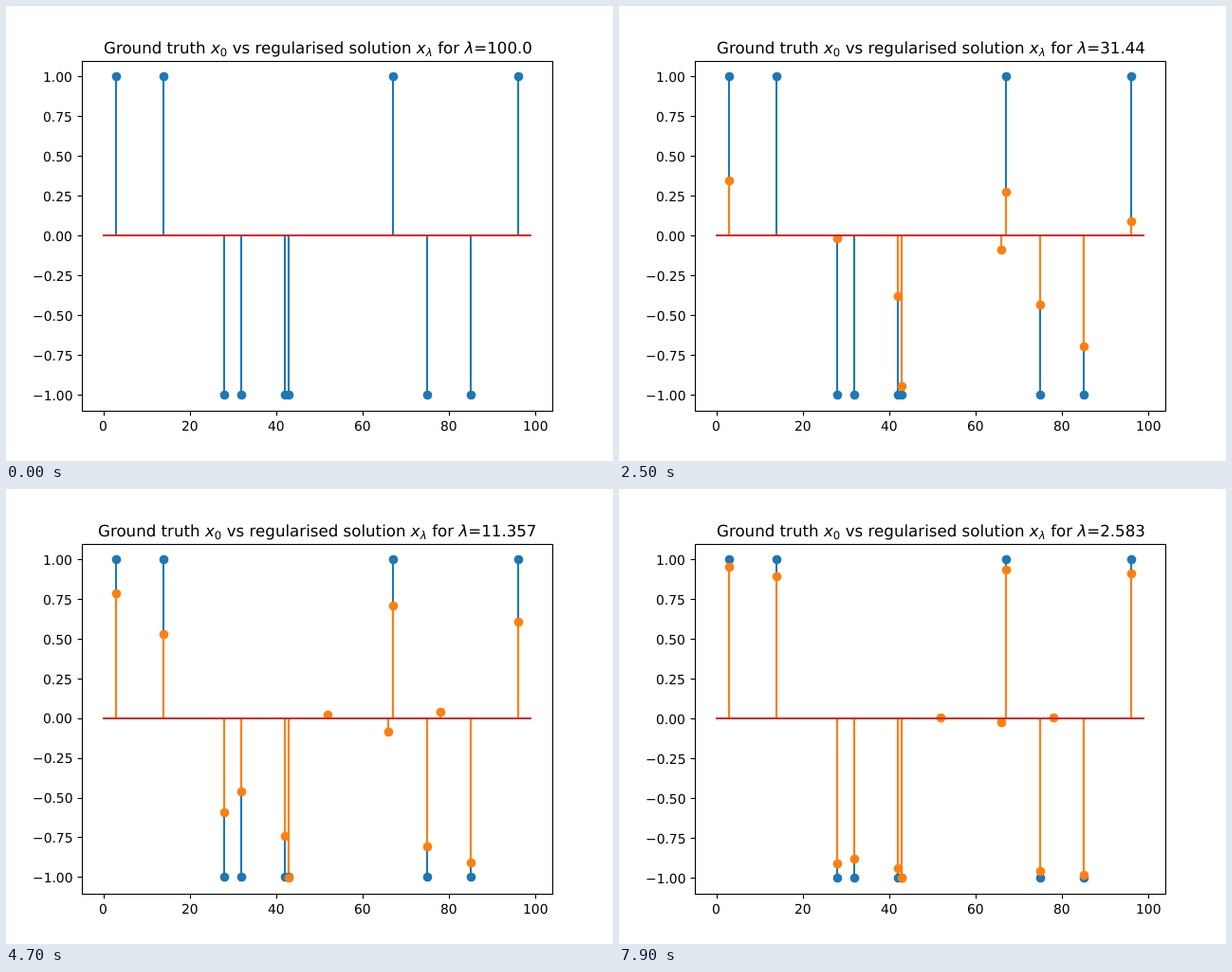
Write an HTML page that moves like this. It is 640 px wide and 480 px high and loops after 8000 ms.

```html
<!DOCTYPE html>
<html lang="en">
<head>
<meta charset="utf-8">
<title>Regularisation path</title>
<style>
  html, body { margin: 0; width: 100%; height: 100%; overflow: hidden; background: #fff; }
  svg { display: block; width: 640px; height: 480px; }
  text { font-family: "DejaVu Sans", sans-serif; font-size: 13.889px; text-rendering: geometricPrecision; white-space: pre; }
  .title { font-size: 16.667px; }
  .sub { font-size: 11.667px; }
  .var { font-style: italic; }
</style>
</head>
<body>
<svg id="stage" viewBox="0 0 640 480"></svg>
<script>
const BLUE = '#1f77b4', ORANGE = '#ff7f0e', RED = '#d62728';
const STEP = 100, STEPS = 80;
const TOP = 57.6, BOTTOM = 427.2, LEFT = 80, RIGHT = 576;
const KINK = 21.05; // below this lambda every path runs straight to its true value

// Each path leaves zero at lambda = start and reaches level at the kink.
const path = (truth, pos, level, start = KINK) => ({ truth, pos, level, start });
const paths = [
  path(1, 3, .611, 45.3),
  path(1, 14, .129, 27),
  path(-1, 28, -.245, 32),
  path(-1, 32, 0),
  path(-1, 42, -.52, 58),
  path(-1, 43, -1.0115, 95.5),
  path(0, 52, .04, 26),
  path(0, 66, -.158, 45),
  path(1, 67, .463, 47),
  path(-1, 75, -.64, 53),
  path(0, 78, .08, 27),
  path(-1, 85, -.83, 75),
  path(1, 96, .272, 36.6)
];

function coefficient({ truth, level, start }, lambda) {
  if (lambda <= KINK) return truth + (level - truth) * lambda / KINK;
  if (lambda >= start) return 0;
  const span = start - KINK;
  const bend = 1 + .375 * (span / 74.5) ** 4; // long paths curve more
  return level * (1 - ((lambda - KINK) / span) ** bend);
}

const stage = document.getElementById('stage');
function add(tag, attrs, text, parent = stage) {
  const el = document.createElementNS('http://www.w3.org/2000/svg', tag);
  set(el, attrs);
  if (text !== undefined) el.textContent = text;
  return parent.appendChild(el);
}
function set(el, attrs) {
  for (const name in attrs) el.setAttribute(name, attrs[name]);
}
// Starts a text on a whole pixel; share is the part of its width left of x.
function alignText(el, x, share) {
  set(el, { x: Math.round(x - share * el.getComputedTextLength()) });
}

const xAt = v => LEFT + (v + 4.95) * (RIGHT - LEFT) / 108.9;
const line = (stroke, width = 2.083) => add('line', { stroke, 'stroke-width': width });
const dot = fill => add('circle', { fill, r: 4.86 });
const baseline = () => {
  const el = line(RED);
  set(el, { x1: Math.round(xAt(0)) - 1, x2: Math.round(xAt(99)) + 1 });
  return el;
};

const truths = paths.filter(p => p.truth);
for (const p of truths) p.blueStem = line(BLUE);
for (const p of paths) p.stem = line(ORANGE);
for (const p of truths) p.blueDot = dot(BLUE);
const baseLow = baseline();
for (const p of paths) p.dot = dot(ORANGE);
const baseTop = baseline();

for (let v = 0; v <= 100; v += 20) {
  const x = Math.round(xAt(v)) + .5;
  set(line('#000', 1.111), { x1: x, x2: x, y1: 427.5, y2: 432.3 });
  alignText(add('text', { y: 448 }, v), xAt(v), .5);
}
const yTicks = [];
for (let value = -1; value <= 1; value += .25) {
  const mark = line('#000', 1.111);
  set(mark, { x1: 75.6, x2: 80.5 });
  const label = add('text', {}, (value < 0 ? '\u2212' : '') + Math.abs(value).toFixed(2));
  alignText(label, 70.28, 1);
  yTicks.push({ value, mark, label });
}
add('rect', { x: 80.5, y: 58.5, width: 496, height: 369, fill: 'none', stroke: '#000', 'stroke-width': 1.111 });

const title = add('text', { class: 'title', y: 50 });
const span = (text, attrs = {}) => add('tspan', attrs, text, title);
span('Ground truth ');
span('x', { class: 'var' });
span('0', { class: 'sub', dy: 2.7 });
span(' vs regularised solution ', { dx: .3, dy: -2.7 });
span('x', { class: 'var' });
span('λ', { class: 'sub var', dy: 2.7 });
span(' for ', { dx: .3, dy: -2.7 });
span('λ', { class: 'var' });
const readout = span('');

function draw(step) {
  const lambda = 10 ** (2 - 4 * step / 199);
  const rounded = String(+lambda.toFixed(3));
  readout.textContent = '=' + (rounded.includes('.') ? rounded : rounded + '.0');
  alignText(title, 328.3, .5);

  for (const p of paths) p.value = coefficient(p, lambda);
  const low = Math.min(-1, ...paths.map(p => p.value));
  const unit = (BOTTOM - TOP) / 1.1 / (1 - low);
  const yAt = v => 74.4 + (1 - v) * unit;
  const zero = Math.round(yAt(0));

  const place = (pos, stem, marker, value) => {
    const x = Math.round(xAt(pos)), y = Math.round(yAt(value));
    set(stem, { x1: x, x2: x, y1: zero, y2: y });
    set(marker, { cx: x + .5, cy: y + .5 });
  };
  for (const p of truths) place(p.pos, p.blueStem, p.blueDot, p.truth);
  for (const p of paths) {
    const visibility = p.value ? 'visible' : 'hidden';
    place(p.pos, p.stem, p.dot, p.value);
    set(p.stem, { visibility });
    set(p.dot, { visibility });
  }
  for (const b of [baseLow, baseTop]) set(b, { y1: zero, y2: zero });
  for (const { value, mark, label } of yTicks) {
    const y = yAt(value), row = Math.round(y) + .5;
    set(mark, { y1: row, y2: row });
    set(label, { y: Math.round(y + 5.5) });
  }
}

let start, shown = -1;
function tick(now) {
  start ??= now;
  const step = Math.floor((now - start) / STEP) % STEPS;
  if (step !== shown) draw(shown = step);
  requestAnimationFrame(tick);
}
draw(0);
requestAnimationFrame(tick);
</script>
</body>
</html>
```
